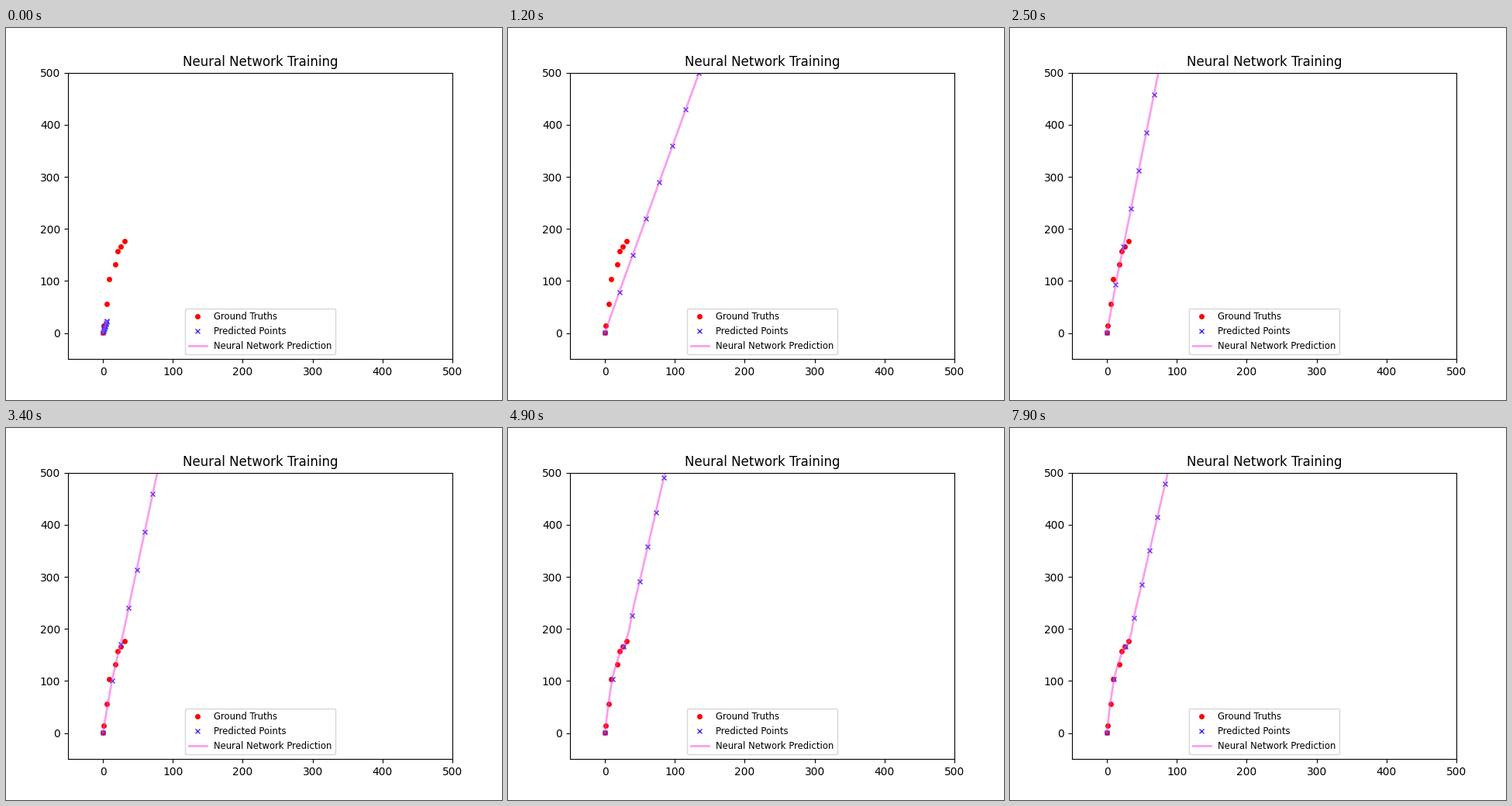
Animation, 640 px wide and 480 px high, one loop 8 s. Source, as a matplotlib script:

```python
import numpy as np
import matplotlib.pyplot as plt
from matplotlib.animation import FuncAnimation

FRAMES, STEP = 80, 100

# Training progress: step, output at t=3 (x, y), stride per 3 units (x, y)
KEYS = np.array([
    (0, 1, 4, 0.5, 2.2),
    (1, 3, 15, 4, 12),
    (3, 24, 63, 26, 60),
    (5, 20, 80, 20, 76),
    (7, 8.7, 72, 8.1, 64.3),
    (9, 12, 66, 11, 59),
    (12, 20.5, 79, 19, 70),
    (17, 16.6, 92, 14.2, 80.6),
    (22, 12, 88, 10.2, 74),
    (27, 13, 97, 11.7, 73),
    (34, 12.8, 100, 11.5, 72.8),
    (42, 11.5, 102.5, 11.8, 68.5),
    (49, 10.5, 103.5, 11.5, 66.3),
    (61, 10.3, 103.5, 11.3, 65.3),
    (79, 10.3, 103.5, 11.2, 64.4),
])

# Fully trained deviation from straight segments at t = 1..8
BEND = np.array([(-2, -16), (-2, -12), (0, 0), (-0.5, 4.5),
                 (-0.2, 8), (0, 0), (0.5, -8), (0.6, -8)])

TRUTH = np.array([(0, 0.5), (1, 14), (5.5, 56), (9, 103.5),
                  (17.5, 132), (21, 157), (25.5, 166), (31, 176.5)])

KNOTS = np.array([0, 3, 6, 9, 12, 30])
NODES = np.r_[0:10, KNOTS[4:]]
T_LINE = np.linspace(0, 30, 301)


def smooth(x, xs, ys):
    """Cubic Hermite curve through the rows of ys."""
    m = np.gradient(ys, xs, axis=0)
    i = np.clip(np.searchsorted(xs, x, side="right") - 1, 0, len(xs) - 2)
    h = (xs[i + 1] - xs[i])[:, None]
    u = (x - xs[i])[:, None] / h
    return ((1 + 2 * u) * (1 - u) ** 2 * ys[i] + u * (1 - u) ** 2 * h * m[i]
            + u ** 2 * (3 - 2 * u) * ys[i + 1] - u ** 2 * (1 - u) * h * m[i + 1])


def bump(k, mid, width):
    return np.exp(-((k - mid) / width) ** 2)


def predict(k):
    row = smooth(np.array([float(k)]), KEYS[:, 0], KEYS[:, 1:])[0]
    p3, stride = row[:2], row[2:]
    bend = 1 / (1 + np.exp((42 - k) / 5))
    p0 = np.array([-2 * bump(k, 3, 1.5), 0.8 + 4 * bump(k, 6, 3)])
    p6 = p3 + stride + [5.3 * bend, -1.5 * bend - 4.2 * bump(k, 41, 10)]
    p9 = p6 + stride + bend * np.array([0.6, -9.5])
    pts = np.array([p0, p3, p6, p9, p9 + stride, p9 + 7 * stride])
    nodes = np.column_stack([np.interp(NODES, KNOTS, c) for c in pts.T])
    nodes[1:9] += bend * BEND
    return smooth(T_LINE, NODES, nodes)


fig, ax = plt.subplots(figsize=(6.4, 4.8), dpi=100)
ax.set(xlim=(-50, 500), ylim=(-50, 500), title="Neural Network Training")
ax.plot(*TRUTH.T, "o", color="red", ms=4, label="Ground Truths")
marks, = ax.plot([], [], "x", color="#3a30f5", ms=4, label="Predicted Points")
line, = ax.plot([], [], color="#f542dd", lw=2, alpha=0.5,
                label="Neural Network Prediction")
ax.legend(loc="lower center", fontsize="small")


def update(frame):
    path = predict(frame)
    line.set_data(*path.T)
    marks.set_data(*path[::30].T)
    return marks, line


anim = FuncAnimation(fig, update, frames=FRAMES, interval=STEP,
                     repeat=True, repeat_delay=0)
plt.show()
```
